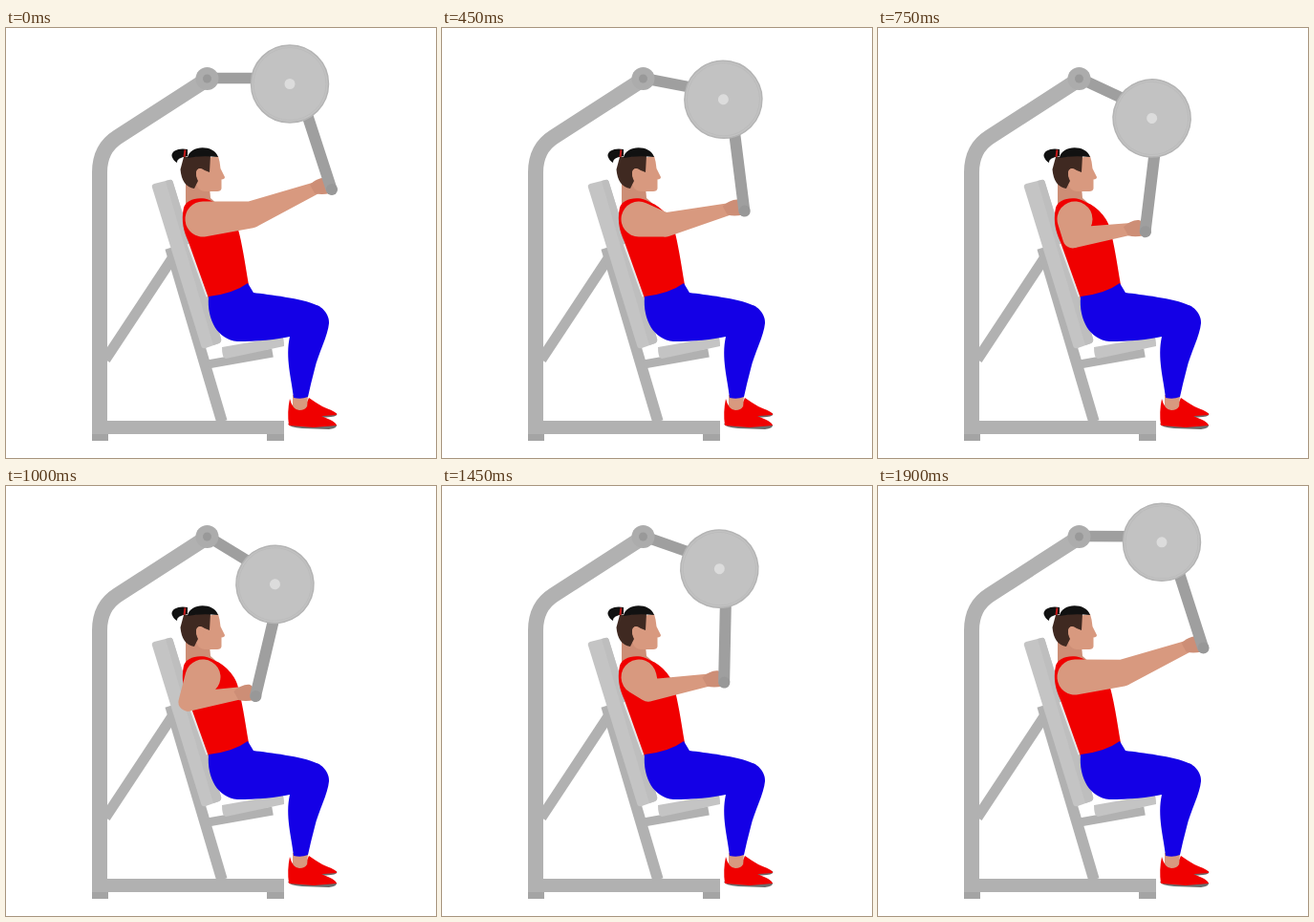
An HTML page for the animation above (1.95 s loop, 450 by 450 pixels).

```html
<!DOCTYPE html>
<html lang="en">
<head>
<meta charset="utf-8">
<title>Seated chest press</title>
<style>
html, body { margin: 0; width: 100%; height: 100%; overflow: hidden; background: #fff; }
svg { display: block; width: 100vw; height: 100vh; }
.frame { fill: none; stroke: #b1b1b1; }
.skin { fill: #d8997f; }
.shade { fill: #cd8e76; }
.red { fill: #f00000; }
.sole { fill: #6b6b6b; }
.hair { fill: #111; }
</style>
</head>
<body>
<svg viewBox="0 0 450 450">
  <!-- machine -->
  <g class="frame">
    <path d="M178 235L104 347" stroke-width="11"/>
    <path d="M172 230L226 412" stroke-width="11.5"/>
    <path d="M211 352L279 340" stroke-width="9"/>
    <path d="M98 426V151Q98 126 117 114L210 54" stroke-width="16"/>
    <path d="M105 418H291" stroke-width="14"/>
  </g>
  <path d="M90 425h17v7h-17zM273 425h18v7h-18z" fill="#a4a4a4"/>
  <path d="M153 167Q152 164 155 163L171 159Q174 158 175 162L225 325Q226 328 223 330L209 335Q205 336 204 332Z" fill="#c4c4c4"/>
  <path d="M167 160L171 159Q174 158 175 162L225 325Q226 328 223 330L217 332Z" fill="#bebebe"/>
  <path d="M226 334L289 323Q291 324 291 333L230 346Q226 346 226 334Z" fill="#c4c4c4"/>

  <!-- feet -->
  <path class="sole" d="M316 405L346 403Q348 406 340 407L318 409Z"/>
  <path class="red" d="M312 398L317 387Q324 392 331 396C340 400 347 402 346 405L318 407Z"/>
  <path class="skin" d="M300 384H316L315 398L307 403L300 399Z"/>
  <path class="sole" d="M295 414L346 415Q347 419 338 420L310 419Q296 418 295 414Z"/>
  <path class="red" d="M297 388Q300 400 307 400Q313 400 315 396C322 406 345 409 346 416L322 418L296 416Q294 402 297 388Z"/>

  <!-- body -->
  <path class="shade" d="M188 162V184L205 192L222 185L214 178L213 166Z"/>
  <path d="M191 226L211 281" stroke="#e9e9e9" stroke-width="3"/>
  <path class="red" d="M208 178.500C197 177 188 181 186 188C183 202 186 213 191 224L212 283C228 285 246 278 254 269C250 245 247 225 243 211C241 199 228 186 219 183C215 181 212 179 208 178.500Z"/>
  <path d="M212 281Q238 278 253 267L259 277C275 279 310 283 325 290C330 291 339 300 338 309C337 322 327 340 323 357Q319 372 316 386Q309 389 301 387C299 368 292 345 297 323C284 326 262 328 242 328C222 326 210 306 212 281Z" fill="#1400e6"/>

  <!-- head -->
  <path class="skin" d="M198 138L222 134Q224 140 224.500 147L229 156Q229 158 225.500 158.500V168Q225 171 221 171H208Q198 170 198 155Z"/>
  <path d="M186 135L214 133L213 151L208 149Q201 144 199 151Q199 157 201 160L197 168Q184 166 182.500 148Z" fill="#3f2921"/>
  <ellipse class="skin" cx="203" cy="152.500" rx="4" ry="5.500"/>
  <path class="hair" d="M190 136C192 122 218 122 222 135Q204 133 190 136Z"/>
  <path class="hair" d="M190 127C182 125 173 128 173.500 134Q175 139 179 141Q178 136 190 134Z"/>
  <path d="M187.500 127.500L186.500 135" stroke="#c01818" stroke-width="2"/>

  <!-- moving parts -->
  <path id="arm" class="skin"/>
  <path id="hand" class="shade" d="M-23 -5C-18 -10 -11 -13 -6 -12Q-2 -10 0 -3L-2 4Q-11 6 -18 4Z"/>
  <g id="lever">
    <path d="M210.500 52.500H272" stroke="#9f9f9f" stroke-width="11.500"/>
    <path d="M311 78L340.500 168.500" stroke="#9f9f9f" stroke-width="12" stroke-linecap="round"/>
    <circle cx="341" cy="169" r="6" fill="#989898"/>
    <circle cx="297" cy="58.500" r="40.500" fill="#c2c2c2" stroke="#b4b4b4" stroke-width="1.500"/>
    <circle cx="297" cy="58.500" r="38" fill="none" stroke="#bcbcbc"/>
    <circle cx="297" cy="58.500" r="5.500" fill="#dcdcdc"/>
  </g>
  <circle cx="210.500" cy="53" r="12" fill="#acacac"/>
  <circle cx="210.500" cy="53" r="4.500" fill="#999"/>
</svg>
<script>
const LOOP = 1950, STEP = 50, SWING = 31.7;
const PIVOT = { x: 210.5, y: 53 }, GRIP = { x: 341, y: 169 };
const SHOULDER = { x: 206, y: 200, r: 18.5 };
const ELBOW_OUT = { x: 256, y: 195.5, r: 14 }, ELBOW_IN = { x: 190, y: 226, r: 10 };

const el = id => document.getElementById(id);
const arm = el("arm"), hand = el("hand"), lever = el("lever");
const mix = (a, b, k) => a + (b - a) * k;
const ease = x => (1 - Math.cos(Math.PI * Math.min(1, Math.max(0, x)))) / 2;

// 0 = arms stretched, 1 = handle at the chest
const pull = t => t < 1065 ? ease((t - 45) / 1015) : 1 - ease((t - 1075) / 870);

function turn(p, deg) {
  const a = deg * Math.PI / 180, dx = p.x - PIVOT.x, dy = p.y - PIVOT.y;
  return {
    x: PIVOT.x + dx * Math.cos(a) - dy * Math.sin(a),
    y: PIVOT.y + dx * Math.sin(a) + dy * Math.cos(a)
  };
}

// Outline around a larger circle a and a smaller circle b
function limb(a, b) {
  const dx = b.x - a.x, dy = b.y - a.y;
  const dir = Math.atan2(dy, dx), spread = Math.acos((a.r - b.r) / Math.hypot(dx, dy));
  const on = (c, side) => {
    const angle = dir + side * spread;
    return `${c.x + c.r * Math.cos(angle)} ${c.y + c.r * Math.sin(angle)}`;
  };
  return `M${on(a, 1)}L${on(b, 1)}A${b.r} ${b.r} 0 0 0 ${on(b, -1)}` +
         `L${on(a, -1)}A${a.r} ${a.r} 0 1 0 ${on(a, 1)}Z`;
}

function draw(now) {
  const k = pull(Math.floor((now % LOOP) / STEP) * STEP);
  const grip = turn(GRIP, SWING * k);
  const wrist = { x: grip.x - 18, y: grip.y - 1 - 2 * k, r: 6.5 };
  const elbow = {
    x: mix(ELBOW_OUT.x, ELBOW_IN.x, k),
    y: mix(ELBOW_OUT.y, ELBOW_IN.y, k),
    r: mix(ELBOW_OUT.r, ELBOW_IN.r, k)
  };
  arm.setAttribute("d", limb(SHOULDER, elbow) + limb(elbow, wrist));
  hand.setAttribute("transform", `translate(${grip.x} ${grip.y})`);
  lever.setAttribute("transform", `rotate(${SWING * k} ${PIVOT.x} ${PIVOT.y})`);
}

const start = performance.now();
function tick() {
  draw(performance.now() - start);
  requestAnimationFrame(tick);
}
tick();
</script>
</body>
</html>
```
